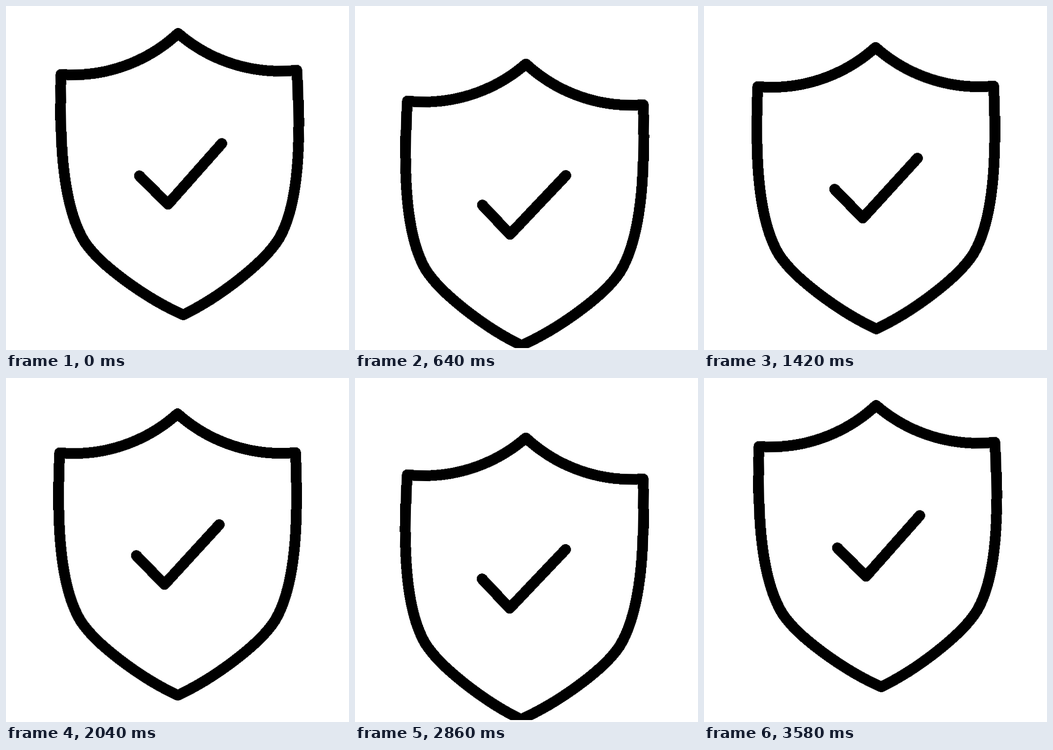
These frames come from a looping animation (700 px wide and 704 px high, 3.6 s). An HTML page:

```html
<!DOCTYPE html>
<html lang="en">
<head>
<meta charset="utf-8">
<title>Floating shield</title>
<style>
  html, body {
    margin: 0;
    width: 100%;
    height: 100%;
    overflow: hidden;
    background: #fff;
  }
  svg {
    display: block;
    width: 700px;
    height: 700px;
    overflow: hidden;
  }
  path {
    fill: none;
    stroke: #000;
    stroke-width: 22px;
    stroke-linecap: round;
    stroke-linejoin: round;
    shape-rendering: crispEdges;
  }
  .bob, .sway {
    animation: bob 3600ms cubic-bezier(.303, 0, .667, 1) infinite;
  }
  .sway {
    animation-name: sway;
    animation-timing-function: cubic-bezier(.333, 0, .667, 1);
    transform-origin: 350px 0;
  }
  @keyframes bob {
    0%, 100% { transform: translateY(-17px); }
    21.39% { transform: translateY(50.5px); }
    50.56% { transform: translateY(-6px); animation-timing-function: cubic-bezier(.4, 0, .667, 1); }
    77.22% { transform: translateY(51.5px); animation-timing-function: cubic-bezier(.333, 0, .61, 1); }
  }
  @keyframes sway {
    0%, 32.61%, 65.06%, 100% { transform: rotate(-1.04deg); }
    15.03%, 47.72% { transform: rotate(1.04deg); }
    80.69% { transform: rotate(1.04deg); animation-timing-function: cubic-bezier(.22, 0, .65, 1); }
  }
</style>
</head>
<body>
<svg viewBox="0 0 700 700" aria-label="Shield with a check mark">
  <g class="bob">
    <g class="sway">
      <path d="M350 73
        A316 316 0 0 1 109.5 152.7
        C107.5 190 107 235 107.5 270
        C109 360 120 444 152 497
        C185 548 280 617 350 649
        C420 617 515 548 548 497
        C580 444 591 360 592.5 270
        C593 235 592.5 190 590.7 152.7
        A316 316 0 0 1 350 73Z"/>
      <path d="M265.7 363.2L323 422.3L435 300"/>
    </g>
  </g>
</svg>
</body>
</html>
```
